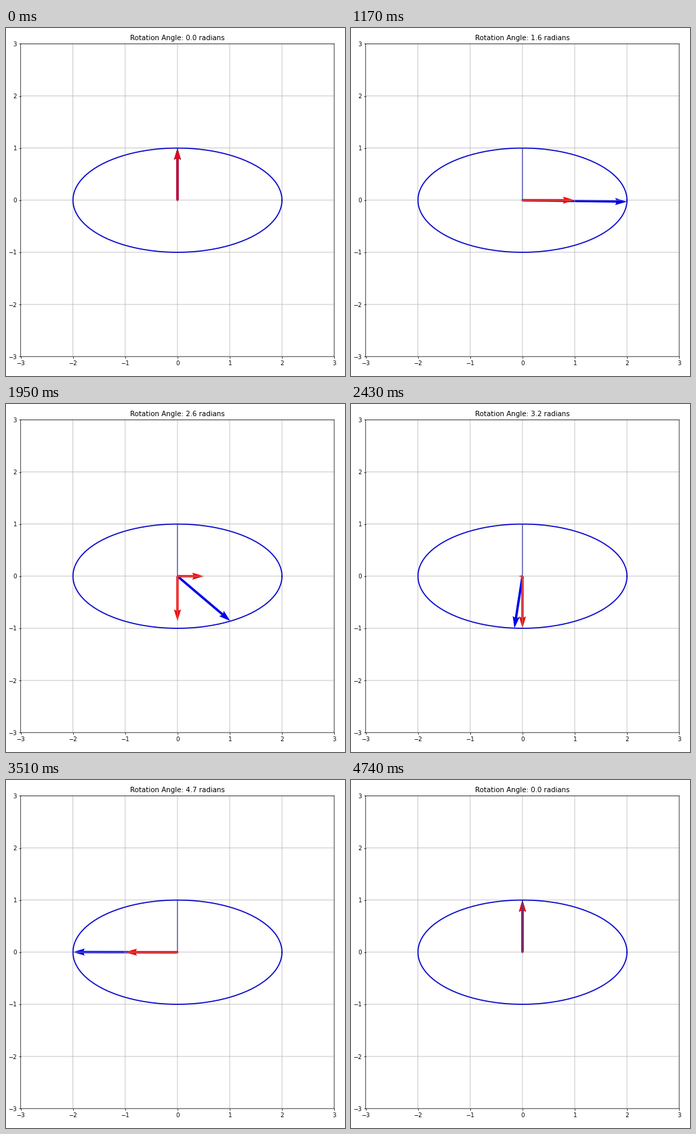
A matplotlib script for the animation above (4770 ms loop, 500x515 px).

```python
import numpy as np
import matplotlib.pyplot as plt
from matplotlib.animation import FuncAnimation

W, H, DPI = 500, 515, 62.5
FRAMES, INTERVAL = 159, 30
A, B = 2, 1  # ellipse half axes
BLUE, RED, OUTLINE, NAVY = "#0000e8", "#ee0606", "#0404cc", "#1818a0"

# Playback pace: a full turn whose speed drifts slightly.
PACE_FRAMES = [1, 39, 65, 96, 117, 142, 158]
PACE_ANGLES = [0, 1.6, 2.61, 3.79, 4.715, 5.7, 2 * np.pi]

plt.rcParams.update({"font.size": 9.9, "path.snap": False})
fig = plt.figure(figsize=(W / DPI, H / DPI), dpi=DPI, facecolor="white")

left, right, top, bottom = 21.7, 484.1, 23.4, 486.2
ax = fig.add_axes([left / W, 1 - bottom / H, (right - left) / W, (bottom - top) / H])
ax.set_xlim(-3, 3)
ax.set_ylim(-3, 3)
ax.set_xticks(range(-3, 4))
ax.set_yticks(range(-3, 4))
ax.grid(True)

t = np.linspace(0, 2 * np.pi, 200)
ax.plot(A * np.cos(t), B * np.sin(t), color=OUTLINE, lw=1.9)
ax.plot([0, 0], [0, B], color=NAVY, lw=1.1)

# The arrows lie below the grid: the rotating vector, then its two components.
origin = np.zeros(3)
arrows = ax.quiver(origin, origin, [0, 0, 0], [1, 0, 1],
                   color=[BLUE, RED, RED],
                   angles="xy", scale_units="xy", scale=1)
title = ax.set_title("")


def update(frame):
    angle = np.interp(frame, PACE_FRAMES, PACE_ANGLES) % (2 * np.pi)
    s, c = np.sin(angle), np.cos(angle)
    arrows.set_UVC([A * s, s, 0], [B * c, 0, c])
    title.set_text(f"Rotation Angle: {angle:.1f} radians")
    return arrows, title


anim = FuncAnimation(fig, update, frames=FRAMES, interval=INTERVAL,
                     repeat=True, repeat_delay=0, blit=False)
plt.show()
```
